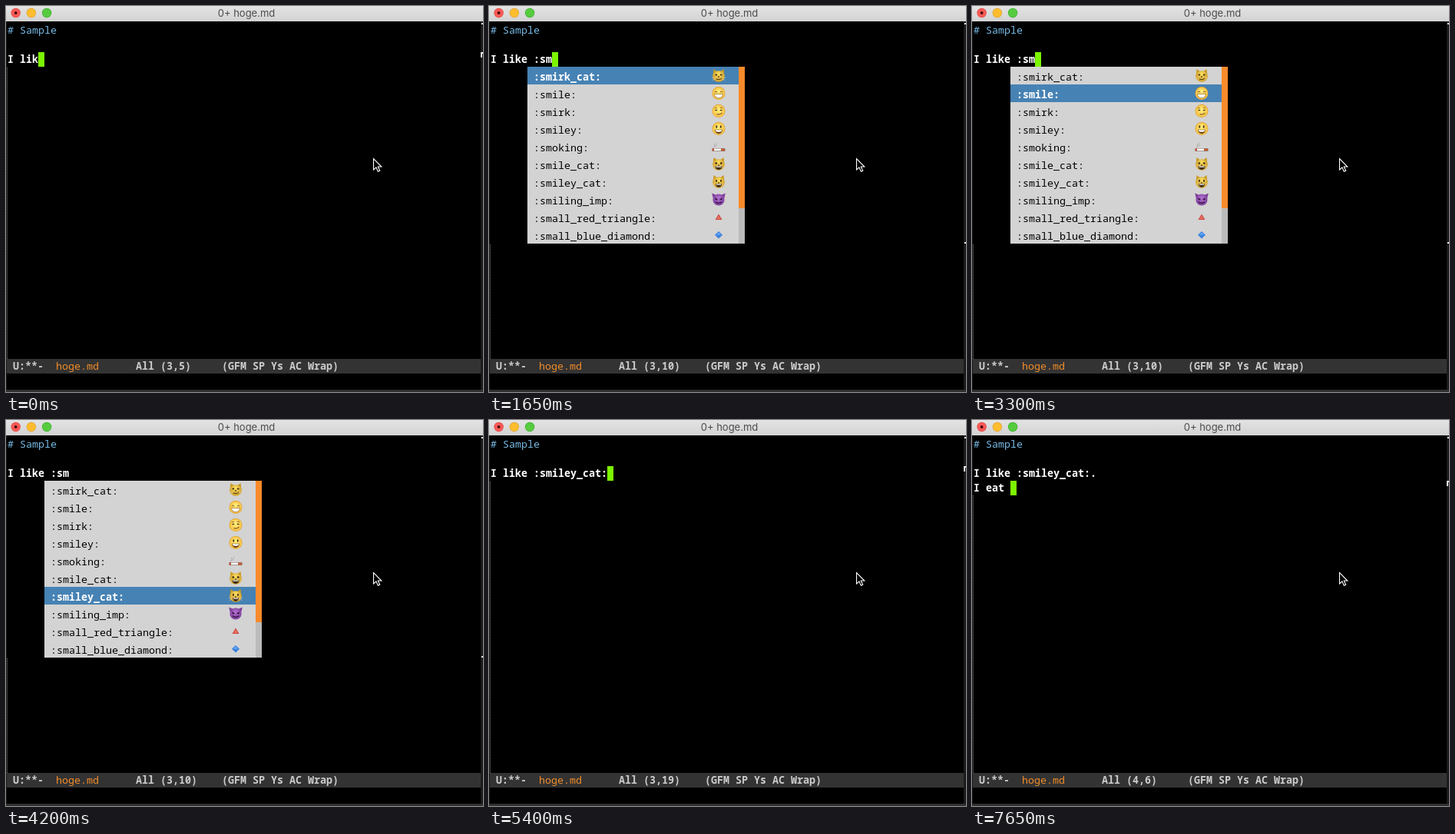
Animation, 621 px wide and 502 px high, one loop 8 s. Source, as an HTML page with a canvas:

```html
<!DOCTYPE html>
<html lang="en">
<head>
<meta charset="utf-8">
<title>Emoji completion in an editor</title>
<style>
  html, body { margin: 0; width: 100%; height: 100%; overflow: hidden; background: #000; }
  canvas { display: block; }
</style>
</head>
<body>
<canvas id="stage" width="621" height="502"></canvas>
<script>
const g = document.getElementById('stage').getContext('2d');
const LOOP = 8000, CELL = 8, LEFT = 2, LINE = 19, ROW = 23, POPUP_TOP = 79, POPUP_END = 309;
const MONO = '"Noto Sans Mono", "DejaVu Sans Mono", monospace';

// Pick the font size whose natural advance is one cell.
g.font = `100px ${MONO}`;
const SIZE = CELL * 100 / g.measureText('M').width;

const LIKE = 'I like :smiley_cat:';
const typed = [
  [0, 'I lik'], [150, 'I like'], [300, 'I like '], [900, 'I like :'], [1050, 'I like :s'],
  [1200, 'I like :sm'], [5400, LIKE], [5700, LIKE + '.'], [6000, LIKE + '.\n'],
  [6450, LIKE + '.\nI'], [6750, LIKE + '.\nI '], [6900, LIKE + '.\nI e'],
  [7200, LIKE + '.\nI ea'], [7500, LIKE + '.\nI eat'], [7650, LIKE + '.\nI eat ']
];
const selection = [[0, -1], [1650, 0], [3300, 1], [3600, 6], [5400, -1]];
const docs = [[0, ''], [2700, 'cat face with wry smile'], [3300, ''],
  [4650, 'smiling cat face with open mouth'], [5400, '']];
const blink = [[0, true], [750, false], [900, true], [2250, false], [2700, true], [3150, false],
  [3300, true], [4200, false], [4650, true], [5100, false], [5400, true]];
const at = (track, t) => track.filter(([start]) => start <= t).pop()[1];

function rect(color, x, y, w, h) {
  g.fillStyle = color;
  g.fillRect(x, y, w, h);
}

function text(str, x, y, color, weight = 500) {
  g.font = `${weight} ${SIZE}px ${MONO}`;
  g.fillStyle = color;
  g.fillText(str, x, y);
}

function oval(color, x, y, rx, ry = rx) {
  g.fillStyle = color;
  g.beginPath();
  g.ellipse(x, y, rx, ry, 0, 0, 7);
  g.fill();
}

function poly(color, ...pts) {
  g.fillStyle = color;
  g.beginPath();
  for (let i = 0; i < pts.length; i += 2) g.lineTo(pts[i], pts[i + 1]);
  g.closePath();
  g.fill();
}

function curve(color, width, x1, y1, cx, cy, x2, y2) {
  g.strokeStyle = color;
  g.lineWidth = width;
  g.beginPath();
  g.moveTo(x1, y1);
  g.quadraticCurveTo(cx, cy, x2, y2);
  g.stroke();
}

function shade(inner, outer) {
  const s = g.createRadialGradient(0, -3, 1, 0, 0, 9);
  s.addColorStop(0, inner);
  s.addColorStop(1, outer);
  return s;
}

const BROWN = '#6b4516', DARK = '#3d2a10';

function openMouth(color, w, y, h) {
  g.fillStyle = color;
  g.beginPath();
  g.moveTo(-w, y);
  g.lineTo(w, y);
  g.quadraticCurveTo(w * 0.8, y + h, 0, y + h);
  g.quadraticCurveTo(-w * 0.8, y + h, -w, y);
  g.fill();
}

function face() {
  oval('#d99a2c', 0, -0.5, 8.5);
  oval(shade('#ffee7c', '#f5b93a'), 0, -0.5, 8);
}

function cat() {
  poly('#c99a22', -7.5, 0, -6.5, -9, -1, -5);
  poly('#c99a22', 7.5, 0, 6.5, -9, 1, -5);
  oval(shade('#f7d95c', '#cb9a2a'), 0, 0.5, 7.8, 7.3);
  for (const s of [-1, 1]) {
    curve('#e2cf8c', 0.7, s * 4.5, 2.5, s * 7, 2, s * 8.8, 2.5);
    curve('#e2cf8c', 0.7, s * 4.5, 4, s * 7, 4.5, s * 8.3, 5.5);
  }
  oval(DARK, 0, 1, 1.1, 0.8);
}

function eyes(x, y, rx, ry) {
  oval(DARK, -x, y, rx, ry);
  oval(DARK, x, y, rx, ry);
}

function happyEyes(y) {
  for (const x of [-3.5, 3.5]) curve(BROWN, 1, x - 1.7, y + 0.7, x, y - 1.5, x + 1.7, y + 0.7);
}

const items = [
  ['smirk_cat', () => {
    cat();
    eyes(3.2, -1.5, 1.4, 1);
    curve(DARK, 1, -3, 4, 2, 5.5, 4, 2.8);
  }],
  ['smile', () => {
    face();
    happyEyes(-2.5);
    openMouth(BROWN, 5.8, 0.5, 5.6);
    openMouth('#fff', 5.2, 1, 4.5);
  }],
  ['smirk', () => {
    face();
    eyes(3.2, -1.5, 1.6, 0.8);
    curve(BROWN, 0.8, -5.2, -4, -3.5, -5, -1.8, -4);
    curve(BROWN, 0.8, 1.5, -4.5, 3.5, -5.5, 5.2, -4);
    curve(BROWN, 1.1, -2.5, 3.8, 2, 4.8, 4.5, 2);
  }],
  ['smiley', () => {
    face();
    eyes(2.7, -3, 1, 1.7);
    openMouth(BROWN, 5.2, 0.8, 5.4);
    openMouth('#fff', 4.6, 1.2, 2.6);
  }],
  ['smoking', () => {
    curve('#9b9b9b', 0.9, -7, 1, -3, -1, -6, -4);
    curve('#b0b0b0', 0.8, -4, 0, -1, -3, -3, -6);
    rect('#8a7a70', -8.5, 2, 17, 4);
    rect('#fff', -6, 2.6, 9, 2.6);
    rect('#c65a32', 3, 2.6, 5, 2.6);
    rect('#d8432e', -8.2, 2.6, 2, 2.6);
  }],
  ['smile_cat', () => {
    cat();
    eyes(3.2, -1.5, 1.4, 1.3);
    openMouth(DARK, 4.8, 2.3, 4.6);
    rect('#fff', -3.6, 2.5, 7.2, 1.2);
  }],
  ['smiley_cat', () => {
    cat();
    eyes(3, -1.7, 1, 1.6);
    openMouth(DARK, 4.2, 2.3, 4.4);
    rect('#fff', -3.2, 2.5, 6.4, 1.2);
  }],
  ['smiling_imp', () => {
    poly('#7d3f9b', -7, -1, -8.8, -8.5, -3, -6);
    poly('#7d3f9b', 7, -1, 8.8, -8.5, 3, -6);
    oval(shade('#ad6ccb', '#7a3a98'), 0, 0, 7.6);
    poly('#2d1038', -5, -2.8, -1, -0.6, -4, 0.6);
    poly('#2d1038', 5, -2.8, 1, -0.6, 4, 0.6);
    curve('#2d1038', 1.1, -4.2, 2.8, 0, 6, 4.2, 2.8);
  }],
  ['small_red_triangle', () => {
    poly('#c9483c', 0, -4.5, 4.5, 3, -4.5, 3);
    poly('#ee7065', 0, -2.5, 2.6, 2, -2.6, 2);
  }],
  ['small_blue_diamond', () => {
    poly('#3a80dc', 0, -5, 5, -0.3, 0, 4.4, -5, -0.3);
    poly('#62a9f8', 0, -3.5, 3.5, -0.3, -3.5, -0.3);
  }]
];

function titleBar() {
  const s = g.createLinearGradient(0, 0, 0, 20);
  s.addColorStop(0, '#e3e3e3');
  s.addColorStop(1, '#d3d3d3');
  rect(s, 0, 0, 621, 20);
  [['#df4744', '#fc5b57'], ['#dea034', '#fdbd2f'], ['#3fae30', '#56cb40']].forEach(([rim, fill], i) => {
    oval(rim, 12.7 + i * 20.2, 9, 6.2);
    oval(fill, 12.7 + i * 20.2, 9, 5.6);
  });
  oval('#4c0d0b', 12.7, 9, 2);
  g.font = '13px Inter, "Liberation Sans", sans-serif';
  g.fillStyle = '#4c4c4c';
  g.textAlign = 'center';
  g.fillText('0+ hoge.md', 313, 14);
  g.textAlign = 'left';
}

function popup(selected, doc) {
  items.forEach(([name, icon], i) => {
    const y = POPUP_TOP + i * ROW, on = i === selected;
    rect(on ? '#4682b4' : '#d3d3d3', 50, y, 275, ROW);
    text(`:${name}:`, 58, y + 18, on ? '#fff' : '#000', on ? 600 : 500);
    g.save();
    g.translate(299, y + 12);
    icon();
    g.restore();
  });
  rect('#bbb', 325, POPUP_TOP, 8, 230);
  rect('#f98b2b', 325, POPUP_TOP, 8, 8 * ROW);
  if (doc) {
    rect('#fff38f', 333, POPUP_TOP, doc.length * CELL, 230);
    text(doc, 333, POPUP_TOP + 18, '#000');
  }
}

function fringe(lines, open, doc) {
  const last = lines.length + 2, emptyEnd = !lines[lines.length - 1];
  const lineTop = 22 + (last - 1) * LINE;
  const dotsFrom = doc ? 459 : open ? POPUP_END : emptyEnd ? lineTop : lineTop + LINE;
  for (let y = dotsFrom + dotsFrom % 2; y < 459; y += 2) rect('#808080', 1, y, 1, 1);

  rect('#fff', 619, 22, 2, 2);
  if (doc) poly('#fff', 617, 455, 621, 455, 621, 459);
  else if (open || emptyEnd) rect('#fff', 619, dotsFrom - 2, 2, 2);
  else {
    rect('#fff', 618, lineTop, 3, 2);
    rect('#fff', 618, lineTop, 2, 7);
  }
}

function statusBar(line, col, doc) {
  rect('#333', 1, 459, 617, 19);
  const pos = `(${line},${col})`.padEnd(10), x = LEFT - 1;
  text(' U:**-', x, 473, '#ccc', 600);
  text('hoge.md', x + 8 * CELL, 473, '#f28c28');
  text(`${doc ? 'Top' : 'All'} ${pos}(GFM SP Ys AC Wrap)`, x + 21 * CELL, 473, '#ccc', 600);
}

function pointer() {
  g.beginPath();
  for (const [x, y] of [[0, 0], [0, 14.5], [3.4, 11.4], [5.8, 16.8], [8.2, 15.7], [5.8, 10.5], [10.3, 10.5]])
    g.lineTo(478.5 + x, 198.5 + y);
  g.closePath();
  g.fillStyle = '#000';
  g.fill();
  g.strokeStyle = '#fff';
  g.lineWidth = 1.1;
  g.stroke();
}

function draw(t) {
  const lines = at(typed, t).split('\n'), selected = at(selection, t), doc = at(docs, t);
  const row = lines.length - 1, col = lines[row].length, open = selected >= 0;

  rect('#000', 0, 0, 621, 502);
  rect('#1c1c1c', 0, 20, 1, 482);
  rect('#1c1c1c', 618, 20, 3, 482);
  rect('#303030', 0, 499, 621, 3);
  titleBar();
  text('# Sample', LEFT, 36, '#79bce8');
  lines.forEach((str, i) => text(str, LEFT, 74 + i * LINE, '#fff', 600));
  if (at(blink, t)) rect('#7cf500', LEFT + col * CELL, 60 + row * LINE, CELL, LINE);
  fringe(lines, open, doc);
  if (open) popup(selected, doc);
  statusBar(row + 3, col, doc);
  pointer();
}

const start = performance.now();
function tick() {
  draw((performance.now() - start) % LOOP);
  requestAnimationFrame(tick);
}
tick();
</script>
</body>
</html>
```
